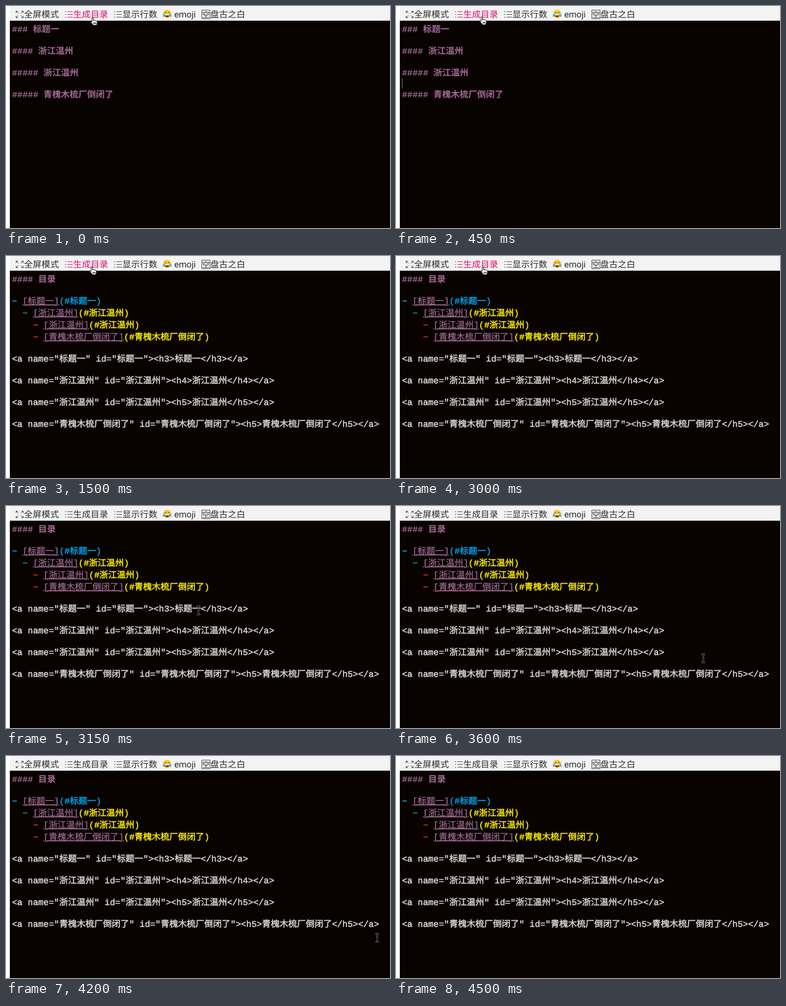
An HTML page that plays this animation: 703x408 px, repeating every 5.88 s.

```html
<!DOCTYPE html>
<html lang="zh-CN">
<head>
<meta charset="utf-8">
<style>
  html, body { margin: 0; width: 100%; height: 100%; overflow: hidden; background: #fff; }
  svg { display: block; width: 703px; height: 408px; }
  text { font-size: 16px; white-space: pre; text-rendering: geometricPrecision; }
  #bar text { font-family: Roboto, "Noto Sans CJK SC", "Noto Sans CJK", sans-serif; fill: #2c2c2c; }
  #bar path, #list { fill: none; }
  #bar { stroke: #444; }
  #bar text, #face { stroke: none; }
  #toc.hover text { fill: #d6106e; }
  #toc.hover { stroke: #d6106e; }
  #before, #after { font-family: "Liberation Mono", "Noto Sans CJK SC", "Noto Sans CJK", monospace; }
  .bold { font-weight: 700; }
  .medium { stroke: currentColor; stroke-width: .55; }
  .link { stroke: currentColor; stroke-width: .25; text-decoration: underline; }
</style>
</head>
<body>
<svg viewBox="0 0 703 408">
  <defs>
    <path id="list" d="M0 1.5h2M4.5 1.5H14M0 6.5h2M4.5 6.5H14M0 11.5h2M4.5 11.5H14"/>
    <path id="beam" d="M1.5 1.5Q4.5 1.5 4.5 4V14Q4.5 16.5 1.5 16.5M7.5 1.5Q4.5 1.5 4.5 4M4.5 14Q4.5 16.5 7.5 16.5M3 11.5H6"/>
  </defs>
  <rect x="7" width="696" height="27" fill="#f3f3f3"/>
  <rect x="7" y="27" width="696" height="381" fill="#090300"/>

  <g id="bar">
    <path d="M18.5 13V9.5H22M18.5 9.5l4.5 4M28 9.5h3.5V13M31.5 9.5l-4.5 4M18.5 18v3.5H22M18.5 21.5l4.5-4M28 21.5h3.5V18M31.5 21.5l-4.5-4"/>
    <text x="33" y="21">全屏模式</text>
    <g id="toc">
      <use href="#list" x="108" y="9"/>
      <text x="123" y="21">生成目录</text>
    </g>
    <use href="#list" x="198" y="9"/>
    <text x="213" y="21">显示行数</text>
    <g id="face" transform="translate(295 14.5)">
      <circle r="7.5" fill="#fcc832"/>
      <path d="M-4.8-1.8Q-3-4-1.2-1.8M1.2-1.8Q3-4 4.8-1.8" style="stroke:#6b3d10"/>
      <path d="M-4.8 .4H4.8Q4.3 6 0 6T-4.8 .4Z" style="fill:#6b3013"/>
      <path d="M-4.3 .6H4.3L3.7 2.8H-3.7Z" style="fill:#fff"/>
      <path d="M-4.5-.5Q-8.5 1-8 4T-5 4.5ZM4.5-.5Q8.5 1 8 4T5 4.5Z" style="fill:#4aaef0"/>
    </g>
    <text x="308" y="21">emoji</text>
    <path d="M358.5 7.5h15v16h-15z"/>
    <text x="359" y="21" style="font-size:14px">空</text>
    <text x="374" y="21">盘古之白</text>
  </g>

  <g id="before"></g>
  <g id="after"></g>
  <rect id="caret" x="11" y="133" width="1" height="18" fill="#807d7c"/>

  <g id="hand" fill="#fff" stroke="#000" stroke-linejoin="round">
    <path d="M4 9.2V2C4 .3 6.6 .3 6.6 2V6.5C6.8 5.4 9 5.5 9 6.8 9.3 6 11.3 6.2 11.3 7.5 11.8 6.9 13.6 7.2 13.6 8.7V11C13.6 13 12.5 13.5 12.5 15.5H6C5.5 13.5 3 11.5 1.8 9.8 .8 8.3 2.4 7.4 4 9.2Z"/>
    <path d="M7.2 10v3.5M9.2 10v3.5M11.2 10v3.5"/>
  </g>
  <g id="ibeam" fill="none">
    <use href="#beam" stroke="#777" stroke-width="2.8"/>
    <use href="#beam" stroke="#090300" stroke-width="1.2"/>
  </g>
  <path id="arrow" d="M.5 .8V14L3.6 11.2 5.7 16.2 8 15.2 5.9 10.4H10.2Z" fill="#000" stroke="#fff"/>
</svg>
<script>
const LOOP = 5880;
const PURPLE = '#a16a94', BLUE = '#01a0e4', GREEN = '#01a252';
const RED = '#db2d20', YELLOW = '#fded02', PLAIN = '#d6d5d4';
const $ = id => document.getElementById(id);

function element(parent, name, attributes, content = '') {
  const node = document.createElementNS('http://www.w3.org/2000/svg', name);
  for (const key in attributes) node.setAttribute(key, attributes[key]);
  node.textContent = content;
  return parent.appendChild(node);
}

// Each run is [text, colour, class].
function line(group, y, runs, indent = 0) {
  const text = element($(group), 'text', { x: 11 + indent * 9.6, y });
  for (const [content, color, style] of runs)
    element(text, 'tspan', { fill: color, color, class: style }, content);
}

const heading = (group, y, level, title) =>
  line(group, y, [['#'.repeat(level) + ' ' + title, PURPLE, 'bold']]);

// The minus sign has the width of the editor's list dash.
const entry = (y, depth, title, dash, url) => line('after', y, [
  ['− ', dash, 'bold'],
  [`[${title}]`, PURPLE, 'link'],
  [`(#${title})`, url, 'medium']
], depth * 2);

const anchor = (y, level, title) => line('after', y, [
  [`<a name="${title}" id="${title}"><h${level}>${title}</h${level}></a>`, PLAIN, 'medium']
]);

const titles = ['标题一', '浙江温州', '浙江温州', '青槐木梳厂倒闭了'];
const levels = [3, 4, 5, 5];
const dashes = [BLUE, GREEN, RED, RED];

heading('after', 48, 4, '目录');
titles.forEach((title, i) => {
  heading('before', 48 + i * 40, levels[i], title);
  entry(88 + i * 22, Math.min(i, 2), title, dashes[i], i ? YELLOW : BLUE);
  anchor(194 + i * 40, levels[i], title);
});

// Pointer stops: [start, shape, x, y]
const pointer = [
  [0, 'hand', 153.5, 20], [150, 'hand', 152, 19], [3000, 'hand', 154, 19],
  [3150, 'ibeam', 348, 183], [3450, 'ibeam', 356, 184], [3600, 'ibeam', 558, 271],
  [3900, 'ibeam', 621, 279], [4050, 'ibeam', 692, 297], [4200, 'ibeam', 675, 325],
  [4350, 'arrow', 668, 387], [4500, 'none', 0, 0]
];

const show = (id, visible) => { $(id).style.display = visible ? '' : 'none'; };

function draw(now) {
  const t = now % LOOP;
  show('before', t < 1500);
  show('after', t >= 1500);
  show('caret', t >= 450 && t < 1050);
  $('toc').classList.toggle('hover', t < 3150);

  const [, shape, x, y] = pointer.findLast(stop => stop[0] <= t);
  for (const id of ['hand', 'ibeam', 'arrow']) show(id, id === shape);
  if (shape !== 'none') $(shape).setAttribute('transform', `translate(${x} ${y})`);
}

const start = performance.now();
function tick() {
  draw(performance.now() - start);
  requestAnimationFrame(tick);
}
tick();
</script>
</body>
</html>
```
